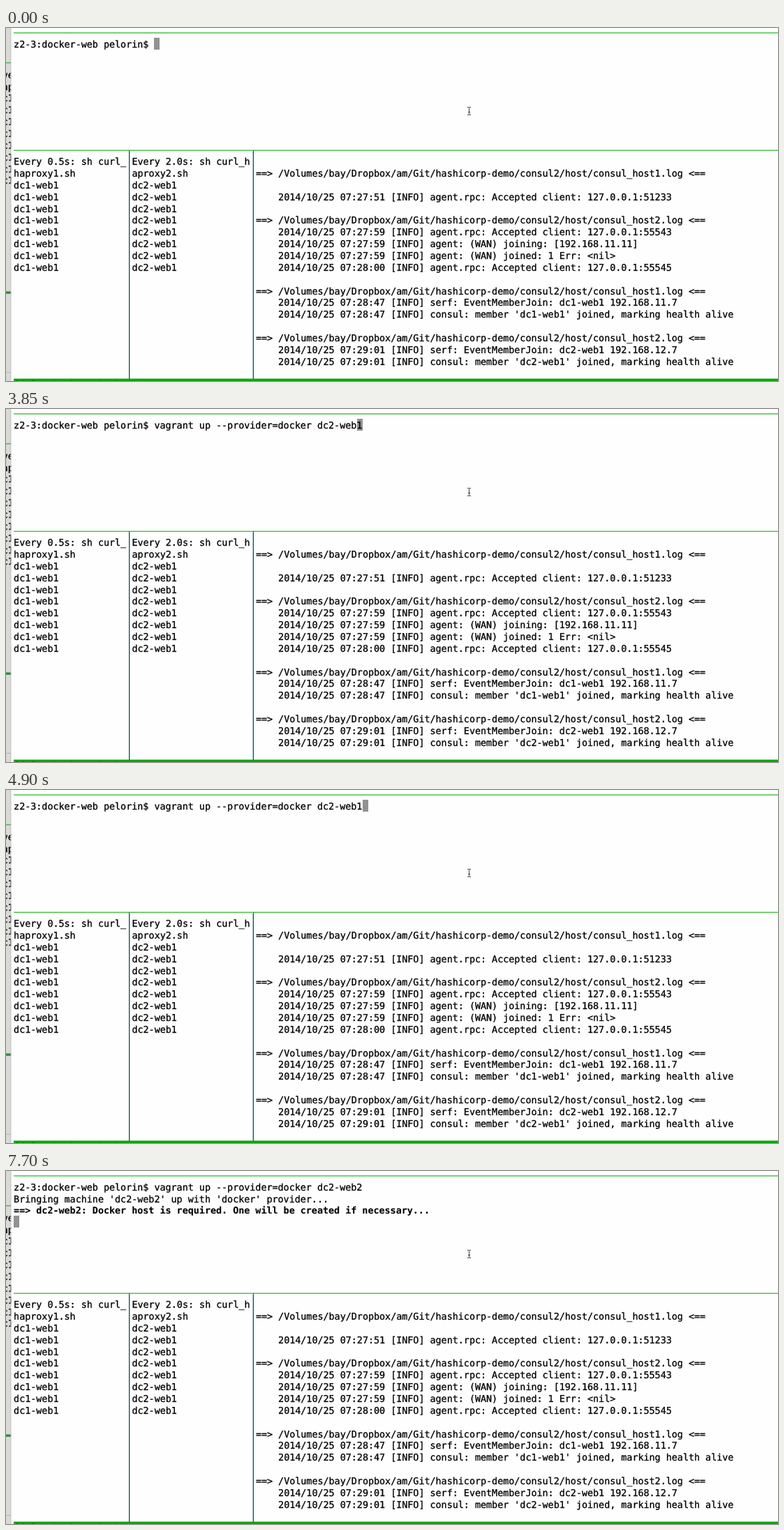
Write an HTML page that moves like this. It is 1106x506 px and loops after 8 s.

```html
<!DOCTYPE html>
<html lang="en">
<head>
<meta charset="utf-8">
<title>Terminal session</title>
<style>
  html, body { margin: 0; width: 100%; height: 100%; overflow: hidden; background: #fff; }
  svg { display: block; width: 1106px; height: 506px; }
  text {
    font: 13.396px "DejaVu Sans Mono", monospace;
    white-space: pre;
    text-rendering: geometricPrecision;
    fill: #000; stroke: #000; stroke-width: .3px;
  }
  .bold { font-weight: bold; stroke-width: .1px; }
  #window { fill: #fefefe; }
  #cursor { fill: #929292; }
  .border { fill: #3fc03f; }
  .divider { fill: #1f4a50; }
  .fringe { fill: #9cc9d2; }
  .dim #window { fill: #e8e8e8; }
  .dim #cursor { fill: #938fa6; }
  .dim .border { fill: #5cbc5c; }
  .dim .divider { fill: #477f85; }
  .dim text { fill: #161616; stroke: #161616; stroke-width: .15px; }
</style>
</head>
<body>
<svg id="stage" viewBox="0 0 1106 506">
  <rect width="8" height="506" fill="#d9d9d6"/>
  <rect y="49" width="8" height="1.5" fill="#55b455"/>
  <rect y="377.5" width="8" height="3.5" fill="#388b3c"/>
  <rect y="493" width="8" height="1" fill="#b4b4b2"/>
  <g id="behind"></g>
  <rect x="6.5" width="1" height="506" fill="#bdbdbb"/>
  <rect id="window" x="7.5" width="1098.5" height="506"/>
  <rect class="border" x="11" y="6.3" width="1095" height="1.4"/>
  <rect class="border" x="11" y="174.7" width="1095" height="1.4"/>
  <rect class="divider" x="176" y="175.4" width="1" height="327.6"/>
  <rect class="fringe" x="177" y="177" width="1" height="326"/>
  <rect class="divider" x="354" y="175.4" width="1" height="327.6"/>
  <rect class="fringe" x="353" y="177" width="1" height="326"/>
  <rect x="11" y="502.6" width="1095" height="3.4" fill="#0ca50c"/>
  <rect id="cursor" width="8" height="17"/>
  <g id="panes"></g>
  <path d="M661 113.5h2l.5 1 .5-1h2M663.5 114.5v9M661 124.5h2l.5-1 .5 1h2M662 120.5h3" fill="none" stroke="#444"/>
</svg>
<script>
const LEFT = 11.1, TOP = 14.1, COL = 8.065, ROW = 16.852, BASE = 13.6;
const LOOP = 8000;
const $ = id => document.getElementById(id);

function addText(parent, col, row, str = "", cls = "") {
  const el = document.createElementNS("http://www.w3.org/2000/svg", "text");
  el.setAttribute("x", LEFT + col * COL);
  el.setAttribute("y", TOP + row * ROW + BASE);
  el.setAttribute("class", cls);
  el.textContent = str;
  parent.append(el);
  return el;
}

const panes = $("panes");
const addLines = (col, row, lines) =>
  lines.forEach((line, i) => line && addText(panes, col, row + i, line));

// Output of the two watch panes
addLines(0, 10, ["Every 0.5s: sh curl_", "haproxy1.sh", ...Array(8).fill("dc1-web1")]);
addLines(21, 10, ["Every 2.0s: sh curl_h", "aproxy2.sh", ...Array(8).fill("dc2-web1")]);

// Log pane
const head = n => `==> /Volumes/bay/Dropbox/am/Git/hashicorp-demo/consul2/host/consul_host${n}.log <==`;
const info = (time, msg) => `    2014/10/25 ${time} [INFO] ${msg}`;
const client = port => `agent.rpc: Accepted client: 127.0.0.1:${port}`;
const joined = (n, time) => [
  head(n),
  info(time, `serf: EventMemberJoin: dc${n}-web1 192.168.1${n}.7`),
  info(time, `consul: member 'dc${n}-web1' joined, marking health alive`)
];
addLines(43, 11, [
  head(1), "",
  info("07:27:51", client(51233)), "",
  head(2),
  info("07:27:59", client(55543)),
  info("07:27:59", "agent: (WAN) joining: [192.168.11.11]"),
  info("07:27:59", "agent: (WAN) joined: 1 Err: <nil>"),
  info("07:28:00", client(55545)), "",
  ...joined(1, "07:28:47"), "",
  ...joined(2, "07:29:01")
]);
addText(panes, 0, 29, "[dc] 0:bash- 1:bash*");

// Sliver of the window behind
$("behind").setAttribute("transform", "translate(-24.5 -124.5)");
["ve", "ap", ...Array(8).fill("c1")].forEach((s, i) => addText($("behind"), 1, 10 + i, s));

const prompt = "z2-3:docker-web pelorin$ ";
const command = "vagrant up --provider=docker dc2-web";
const typed = prompt + command;
const output = [
  "Bringing machine 'dc2-web2' up with 'docker' provider...",
  "==> dc2-web2: Docker host is required. One will be created if necessary..."
];
const shell = [0, 1, 2].map(r => addText(panes, 0, r, "", r === 2 ? "bold" : ""));

// Each step: start time, input line, cursor column, cursor row
const steps = [
  [0, prompt, 25, 0],
  [350, "(reverse-i-search)`': ", 22, 0],
  [700, "(reverse-i-search)`do': " + command + "1", 46, 0],
  ...[47, 48, 50, 52, 54, 55, 58, 59, 61, 62].map((col, i) => [1050 + i * 350, typed + "1", col, 0]),
  [5250, typed + "2", 62, 0],
  [7000, typed + "2", 0, 1],
  [7350, typed + "2", 0, 2],
  [7700, typed + "2", 0, 3]
];

let shown;
function draw(now) {
  const t = now % LOOP;
  const step = steps.findLast(s => s[0] <= t);
  if (step !== shown) {
    shown = step;
    const [, line, col, row] = step;
    shell[0].textContent = line;
    output.forEach((s, i) => shell[i + 1].textContent = row > i + 1 ? s : "");
    $("cursor").setAttribute("x", Math.floor(LEFT + col * COL));
    $("cursor").setAttribute("y", Math.floor(TOP + row * ROW + .2));
  }
  $("stage").classList.toggle("dim", t >= 4200 && t < 4900);
}

const start = performance.now();
function tick() {
  draw(performance.now() - start);
  requestAnimationFrame(tick);
}
tick();
</script>
</body>
</html>
```
